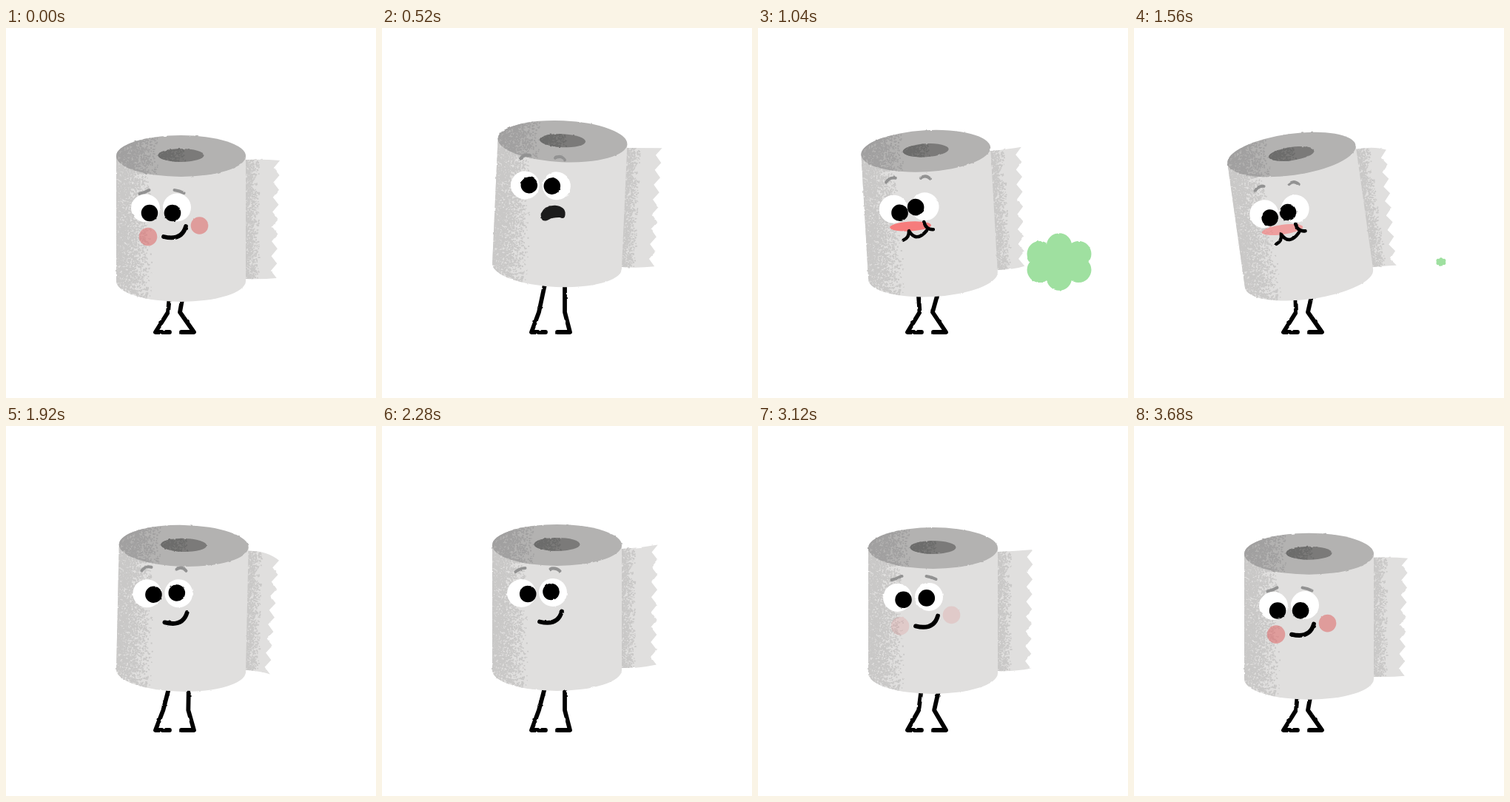
Animation of 500x500 px, one loop 3.72 s. Source, as an HTML page with a canvas:

```html
<!DOCTYPE html>
<html lang="en">
<head>
<meta charset="utf-8">
<style>
  html, body { margin: 0; width: 100%; height: 100%; overflow: hidden; background: #fff; }
  canvas { display: block; filter: url(#rough); }
  svg { position: absolute; }
</style>
</head>
<body>
<svg width="0" height="0">
  <filter id="rough" x="0" y="0" width="1" height="1" color-interpolation-filters="sRGB">
    <feTurbulence type="fractalNoise" baseFrequency=".16" seed="4" result="n"/>
    <feDisplacementMap in="SourceGraphic" in2="n" scale="2.4" xChannelSelector="R" yChannelSelector="G"/>
  </filter>
</svg>
<canvas width="500" height="500"></canvas>
<script>
const ctx = document.querySelector('canvas').getContext('2d');
const LOOP = 3720, STEP = 40;

// Looping track through time:value keys, smooth without overshoot.
function track(keys) {
  const ts = Object.keys(keys).map(Number), vs = Object.values(keys), n = ts.length;
  const T = i => ts[(i + n) % n] + (i < 0 ? -LOOP : i >= n ? LOOP : 0);
  const V = i => vs[(i + n) % n];
  const slope = i => (V(i + 1) - V(i)) / (T(i + 1) - T(i));
  const tangent = i => {
    const a = slope(i - 1), b = slope(i);
    return a * b <= 0 ? 0 : 2 * a * b / (a + b);
  };
  return t => {
    let i = n - 1;
    while (ts[i] > t) i--;
    const d = T(i + 1) - T(i), u = (t - T(i)) / d, w = 1 - u;
    return V(i) * (1 + 2 * u) * w * w + V(i + 1) * u * u * (3 - 2 * u)
      + d * u * w * (tangent(i) * w - tangent(i + 1) * u);
  };
}

const bodyY = track({ 0: 342, 140: 344, 440: 320, 520: 322, 1040: 335, 1200: 339, 1640: 338,
                      2080: 328, 2240: 329, 2560: 343, 2960: 329, 3120: 334, 3360: 340 });
const bodyLean = track({ 0: 0, 140: 0, 480: 2.6, 1040: -3.3, 1300: -8, 1640: -8, 1880: 1.3, 2240: 0 });
const paperDroop = track({ 0: 1, 520: -2, 1040: -3, 1920: 12, 2240: -6, 2560: 6, 3120: -3 });

const mix = (a, b, u) => a + (b - a) * u;
function ease(v, from, to) {
  const u = Math.min(1, Math.max(0, (v - from) / (to - from)));
  return u * u * (3 - 2 * u);
}

// Everything else follows from how high the body stands and which mood it is in.
function pose(t) {
  const y = bodyY(t), h = (342 - y) / 20, droop = paperDroop(t);
  const strain = ease(t, 760, 920) - ease(t, 1480, 1680);
  const arch = ease(t, 140, 440) - ease(t, 2100, 2500);
  const glance = Math.min(1, Math.max(0, 2 * h)) * ease(t, 1640, 1800);
  const stretch = ease(h, .3, .6);
  const gazeY = Math.max(0, 7 - 12 * h), tilt = 3.2 * strain + 1.5 * glance;
  return {
    y, strain, arch, droop,
    lean: bodyLean(t) * Math.PI / 180,
    face: 8.5 * strain - 9 * h,
    brow: -121 - 20 * h - 5 * arch,
    cheeks: 1 - ease(t, 80, 320) + ease(t, 2960, 3400),
    pupils: [[-42.5 + 3.2 * glance + 2.5 * strain, gazeY + tilt],
             [-11.5 + 3.5 * glance - 6.5 * strain, gazeY - tilt]],
    hipL: 221 - 4.5 * strain,
    hipR: 239 + 8 * ease(h, 0, .6),
    kneeL: 219 - 7 * stretch,
    kneeR: 235 + 12 * stretch,
    tipTop: 134 - .4 * droop - 6 * strain,
    tipBase: 130 - .8 * droop - 8 * strain,
    puff: ease(t, 820, 1060) * (1 + .08 * ease(t, 1060, 1200)) - 1.08 * ease(t, 1360, 1620),
    drift: mix(355, 407, ease(t, 820, 1040)) + 8 * ease(t, 1040, 1600)
  };
}

let seed = 11;
const rnd = () => (seed = seed * 16807 % 2147483647) / 2147483647;

// Specks that thin out from left to right.
function grain(x, y, w, h) {
  const p = new Path2D();
  for (let i = w * h * .42; i > 0; i--) {
    const s = 1.2 + rnd();
    p.rect(x + w * (1 - Math.sqrt(rnd())), y + h * rnd(), s, s);
  }
  return p;
}
const bodyGrain = grain(-89, -172, 49, 202);
const lidGrain = grain(-89, -198, 58, 58);
const holeGrain = grain(-32, -180, 40, 20);
const paperGrain = grain(84, -174, 22, 180);

function oval(x, y, rx, ry = rx) {
  const p = new Path2D();
  p.ellipse(x, y, rx, ry, 0, 0, 7);
  return p;
}
function fill(path, color, alpha = 1) {
  ctx.globalAlpha = alpha;
  ctx.fillStyle = color;
  ctx.fill(path);
  ctx.globalAlpha = 1;
}
function grainy(path, color, specks, shade) {
  fill(path, color);
  ctx.save();
  ctx.clip(path);
  fill(specks, shade);
  ctx.restore();
}
function line(d, width, color = '#000') {
  ctx.lineWidth = width;
  ctx.strokeStyle = color;
  ctx.stroke(new Path2D(d));
}

const body = new Path2D('M-87.5-169V0A87.5 28 0 0 0 87.5 0V-169Z');
const lid = oval(0, -169, 87.5, 28), hole = oval(0, -170, 31, 9);
const gasp = new Path2D('M-25-61Q-20-73-6-73Q8-72 8-62Q8-54 1-57Q-8-57-15-53Q-25-48-25-61Z');

const cloud = oval(0, 0, 28, 24);
for (let i = 0; i < 6; i++) {
  const a = (i + .5) * Math.PI / 3;
  cloud.addPath(oval(31 * Math.cos(a), 22 * Math.sin(a), 17.5));
}

function drawCloud(p) {
  if (p.puff <= 0) return;
  ctx.save();
  ctx.translate(p.drift, 316);
  ctx.scale(p.puff, p.puff);
  fill(cloud, '#9fe0a0');
  ctx.restore();
}

function drawLegs(p) {
  const hip = p.y + 20;
  line(`M${p.hipL} ${hip}L${p.kneeL} 384L202 411H221`, 5.8);
  line(`M${p.hipR} ${hip}L${p.kneeR} 384L254 411H237`, 5.8);
}

function drawPaper(p) {
  const top = -164 + p.droop, base = -4.5 + .55 * p.droop, points = 16;
  let d = `M80-164H88Q112-165 ${p.tipTop} ${top}`;
  for (let i = 1; i <= points; i++) {
    const u = i / points;
    d += `L${mix(p.tipTop, p.tipBase, u) - i % 2 * 8} ${mix(top, base, u)}`;
  }
  grainy(new Path2D(d + 'Q108-2 88-3H80Z'), '#e0dfde', paperGrain, '#c9c8c7');
}

function drawBrows({ arch, brow }) {
  ctx.save();
  ctx.translate(0, brow);
  line(`M-56 3Q${mix(-48, -51, arch)} ${mix(1, -4, arch)}-43-2`, 4, '#929292');
  line(`M-9 ${mix(-2, 0, arch)}Q-2 ${mix(-1, -5, arch)} 4 2`, 4, '#929292');
  ctx.restore();
}

function drawMouth(t) {
  if (t >= 200 && t < 760) {
    const open = .3 + .7 * (ease(t, 200, 360) - ease(t, 680, 760));
    ctx.translate(0, -62 * (1 - open));
    ctx.scale(1, open);
    fill(gasp, '#1c1c1c');
  } else if (t >= 760 && t < 1680) {
    line('M-37-56Q-29-59-29-68Q-20-51-5-67M-8-79Q-6-68 4-68', 4.5);
  } else {
    line('M-23.5-60Q1-54 6.5-74', 5.8);
  }
}

function drawFace(p, t) {
  drawBrows(p);
  ctx.translate(0, p.face);
  fill(oval(-48, -98.5, 19.5, 19), '#fff');
  fill(oval(-5.5, -99.5, 19), '#fff');
  fill(oval(-26.5, -74, 28, 6.5), '#f67c7c', p.strain);
  for (const [x, y] of p.pupils) fill(oval(x, y - 99, 11.3), '#000');
  fill(oval(-44.5, -60, 12.3), '#de6464', .55 * p.cheeks);
  fill(oval(25, -75, 11.8), '#de6464', .55 * p.cheeks);
  drawMouth(t);
}

function draw(t) {
  const p = pose(t);
  ctx.clearRect(0, 0, 500, 500);
  ctx.lineCap = ctx.lineJoin = 'round';
  drawCloud(p);
  drawLegs(p);
  ctx.save();
  ctx.translate(236.5, p.y);
  ctx.rotate(p.lean);
  drawPaper(p);
  grainy(body, '#e0dfde', bodyGrain, '#c9c8c7');
  grainy(lid, '#b3b2b1', lidGrain, '#a1a0a0');
  grainy(hole, '#7b7a79', holeGrain, '#6c6c6b');
  drawFace(p, t);
  ctx.restore();
}

const start = performance.now();
function frame() {
  const t = (performance.now() - start) % LOOP;
  draw(Math.floor(t / STEP) * STEP);
  requestAnimationFrame(frame);
}
frame();
</script>
</body>
</html>
```
